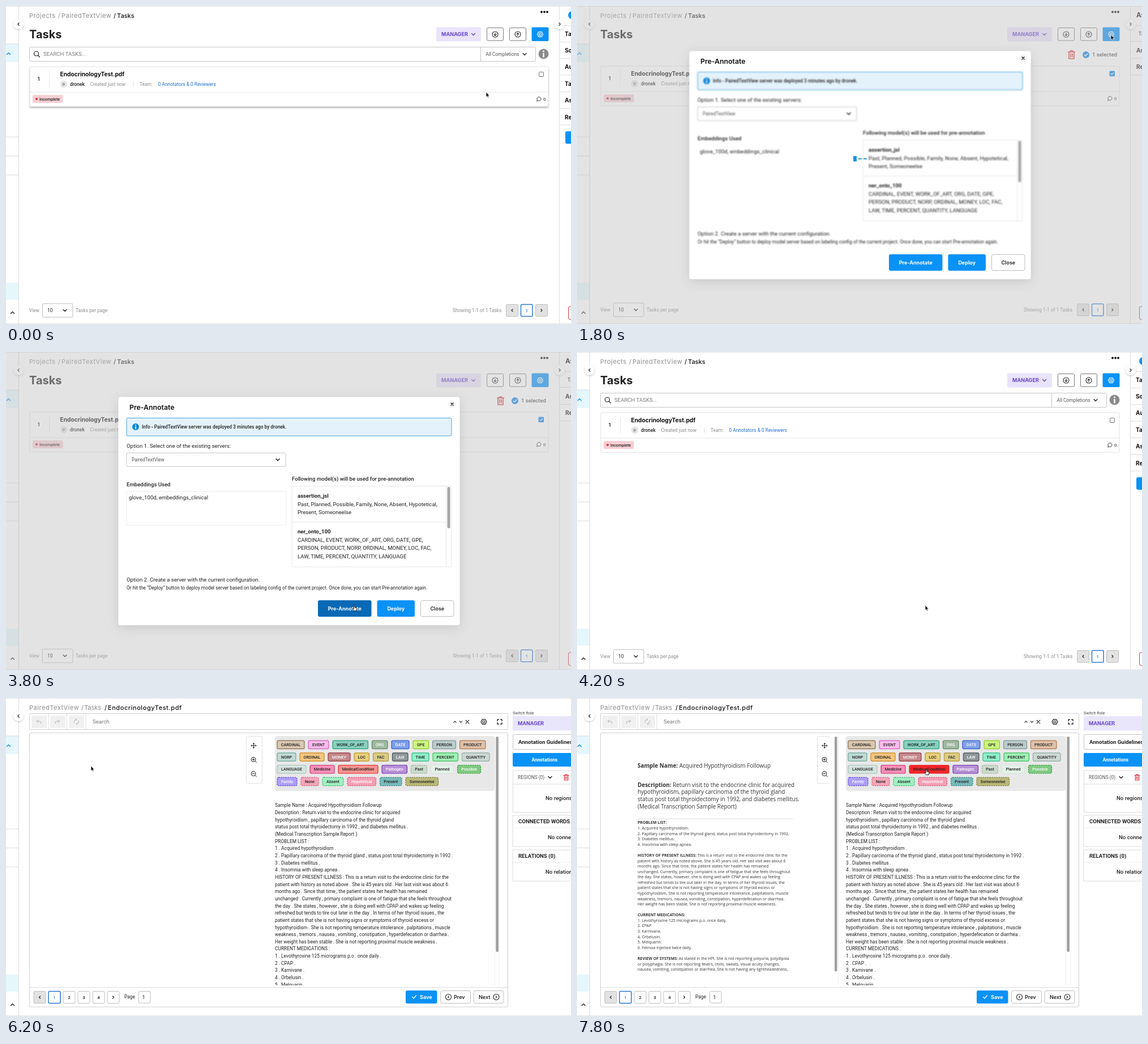
An HTML page for the animation above (8000 ms loop, 998 by 561 pixels).

```html
<!DOCTYPE html>
<html lang="en">
<head>
<meta charset="utf-8">
<title>Task pre-annotation</title>
<style>
html, body { margin: 0; width: 100%; height: 100%; overflow: hidden; background: #fff; }
svg { display: block; width: 100%; height: 100%; }
text { font-family: Roboto, sans-serif; white-space: pre; }
.h { font-family: Inter, sans-serif; }
.m { font-weight: 500; }
.s { font-weight: 600; }
.b { font-weight: 700; }
.crumb { letter-spacing: .55px; }
.doc { font-family: "Open Sans", sans-serif; }
</style>
</head>
<body>
<svg id="stage" viewBox="0 0 998 561"></svg>
<script>
const BLUE = '#0a92f6', PURPLE = '#6847cf', RED = '#d9303c', INK = '#222', GREY = '#8c8c8c', LINE = '#dcdcdc';
const USER = 'dronek', PROJECT = 'PairedTextView', FILE = 'EndocrinologyTest.pdf';

// Drawing helpers; text is placed by its vertical centre.
const text = (x, y, s, size = 8.4, fill = INK, cls = '', anchor = 'start') =>
  `<text x="${x}" y="${y + size * .355}" font-size="${size}" fill="${fill}" class="${cls}" text-anchor="${anchor}">${s}</text>`;
const mid = (x, y, s, size, fill, cls) => text(x, y, s, size, fill, cls, 'middle');
const rect = (x, y, w, h, fill = 'none', stroke = 'none', rx = 0, more = '') =>
  `<rect x="${x}" y="${y}" width="${w}" height="${h}" rx="${rx}" fill="${fill}" stroke="${stroke}" ${more}/>`;
const circle = (x, y, r, fill = 'none', stroke = 'none', more = '') =>
  `<circle cx="${x}" cy="${y}" r="${r}" fill="${fill}" stroke="${stroke}" ${more}/>`;
const path = (d, stroke = INK, width = 1, fill = 'none') =>
  `<path d="${d}" stroke="${stroke}" stroke-width="${width}" fill="${fill}" stroke-linecap="round" stroke-linejoin="round"/>`;
const hline = (x, x2, y, color = LINE) => path(`M${x} ${y}H${x2}`, color);
const vline = (x, y, y2, color = LINE) => path(`M${x} ${y}V${y2}`, color);
const group = (id, body, more = '') => `<g id="${id}" ${more}>${body}</g>`;
const chevron = (x, y, angle, color = INK, r = 3, width = 1.4) =>
  `<g transform="translate(${x} ${y}) rotate(${angle})">${path(`M${-r} ${-r / 2}L0 ${r / 2}L${r} ${-r / 2}`, color, width)}</g>`;
const arrowIcon = (x, y, angle) => circle(x, y, 5, 'none', INK, 'stroke-width="1.1"') +
  `<g transform="translate(${x} ${y}) rotate(${angle})">${path('M0-2.4V2.2M-2 .3L0 2.4L2 .3', INK, 1.1)}</g>`;
const gear = (x, y, color, r = 5) => {
  const pts = [0, 1, 2, 3, 4, 5].map(i => [x + r * Math.cos(i * Math.PI / 3), y + r * Math.sin(i * Math.PI / 3)]);
  return path('M' + pts.join('L') + 'Z', color, 1.2) + circle(x, y, r * .4, 'none', color, 'stroke-width="1.1"');
};
const trash = (x, y, k) => `<g transform="translate(${x} ${y}) scale(${k})">` +
  path('M-6-5H6M-2-5V-7H2V-5M-4.5-5V7H4.5V-5M-1.5-2V4M1.5-2V4', RED, 1.6) + '</g>';
const info = (x, y, r, color) => circle(x, y, r, color) +
  circle(x, y - r * .5, r * .16, '#fff') + path(`M${x} ${y - r * .05}V${y + r * .55}`, '#fff', r * .28);
const pageBox = (x, y, w, label, kind) =>
  rect(x, y, w, 21, kind === 'off' ? '#e2e2e2' : '#fff', kind === 'on' ? '#2a78d8' : '#bdbdbd', 2,
    kind === 'on' ? 'stroke-width="1.5"' : '') +
  (label === '<' ? chevron(x + w / 2, y + 10.5, 90, INK, 2, 1.2)
    : label === '>' ? chevron(x + w / 2, y + 10.5, -90, INK, 2, 1.2)
    : mid(x + w / 2, y + 10.5, label, 8, kind === 'on' ? '#2a78d8' : INK, 'm'));
const knob = (x, angle) => circle(x, 32, 9, '#fff', 'none', 'filter="url(#soft)"') + chevron(x, 32, angle, INK, 2.4, 1.2);

const sidebar = hline(0, 998, .5, '#e4e4e4') + hline(0, 998, 560.5, '#e4e4e4') +
  rect(0, 67, 22, 32, '#e6f6fd') + chevron(4.5, 84, 180, BLUE) +
  [67, 231, 264.5, 298].map(y => hline(0, 22, y)).join('') +
  rect(0, 488, 22, 30, '#e6f7fc') + chevron(11.5, 541, 180) + vline(22.5, 0, 561) + knob(22, 90);

const toolButtons = x => rect(x, 37.5, 79, 25, '#e9e3fb', 'none', 2) +
  text(x + 9, 50, 'MANAGER', 9.1, PURPLE, 'h b') + chevron(x + 65.5, 50, 0, PURPLE) +
  [[89.5, 0], [129.5, 180]].map(([dx, a]) => rect(x + dx, 38.5, 29, 22.5, '#fff', '#777', 2) + arrowIcon(x + dx + 14.5, 50, a)).join('');

const searchBar = rect(41.5, 72.5, 894, 25, '#fff', '#c4c4c4', 2) + vline(838.5, 73, 97, '#c4c4c4') +
  circle(53.5, 84, 4, 'none', INK, 'stroke-width="1.2"') + path('M56.5 87L59.5 90', INK, 1.2) +
  text(66, 85, 'SEARCH TASKS...', 9.6, '#777') + text(847.5, 85, 'All Completions', 8.4, '#555') +
  chevron(916, 85, 0) + info(949.5, 84.5, 9, '#8b8b8b');

const selectedBar = trash(873.5, 86, 1) + circle(899, 86, 6, '#0f8be8') + path('M896.3 86.2L898.3 88.2L901.8 84.2', '#fff', 1.3) +
  text(910, 86, '1 selected', 9.6);

const row = group('rowShade', rect(42, 108, 916, 69.5, '#fff', 'none', 2, 'filter="url(#drop)"')) +
  rect(42, 107, 916, 70, '#fff', '#e2e2e2', 2) + hline(42, 958, 152, '#e6e6e6') +
  vline(76.5, 115, 143, '#e6e6e6') + vline(225, 134, 142) +
  mid(58, 128.5, '1', 9.6, INK, 'm') + text(95.5, 120, FILE, 10.2, '#111', 'h b') +
  circle(102, 138, 6.2, '#e4e4e4') + mid(102, 138.3, 'D', 6, INK) + text(113, 138, USER, 8.4, INK, 'm') +
  text(148.5, 138, 'Created just now', 8.4, GREY) + text(236, 138, 'Team:', 8.4, GREY) +
  text(268.5, 138, '0 Annotators &amp; 0 Reviewers', 8.4, '#226fd4') +
  rect(47, 157, 53.5, 14, '#f9ced4', 'none', 2) + circle(54, 164, 2.1, RED) + text(59, 164, 'Incomplete', 7.2, INK, 'm') +
  path('M937.8 167.6L938.4 165.6A3.5 3.5 0 1 1 940 167.1Z', INK, .9) + text(949, 164, '0', 7.8) +
  rect(941.5, 116.5, 8, 8, '#fff', '#777', 1.5) +
  group('tick', rect(940.5, 115.5, 9.5, 9.5, '#0f86ea', 'none', 1.5) + path('M943 120.3L944.8 122L947.8 118.6', '#fff', 1.1));

const pager = text(41, 537, 'View', 8.4, GREY) + rect(64.5, 525, 53.5, 24, '#fff', '#bbb', 2) + text(73, 537, '10') + chevron(104, 537, 0) +
  text(123, 537, 'Tasks per page', 8.4, GREY) + text(789, 537, 'Showing 1-1 of 1 Tasks', 8.4, GREY) +
  pageBox(883.5, 526.5, 21, '<', 'off') + pageBox(909.5, 526.5, 20.5, '1', 'on') + pageBox(935.5, 526.5, 21, '>', 'off');

const sidePlain = circle(1000, 16, 7, BLUE) + ['Ta', 'So', 'Au', 'Ta', 'As', 'Re'].map((s, i) =>
  text(987, 49 + i * 29.4, s, 10, '#111', 'h b') + hline(978, 998, 34.5 + i * 29.2)).join('') +
  hline(978, 998, 210) + rect(988, 221, 20, 22, BLUE, 'none', 3);
const sideSelected = text(988, 16, 'As', 11.5, '#111', 'h b') + text(991.5, 48.5, 'Ta', 9.6) +
  text(988, 78, 'As', 10, '#111', 'h b') + text(988, 107.5, 'Re', 10, '#111', 'h b') +
  [34.5, 62.5, 92.5, 121.5].map(y => hline(978, 998, y)).join('');

const listPage =
  text(41, 17.5, 'Projects', 11, GREY, 'h crumb') + text(92, 17.5, '/', 11, GREY, 'h') + text(98, 17.5, PROJECT, 11, GREY, 'h crumb') +
  text(190, 17.5, '/', 11, INK, 'h m') + text(196, 17.5, 'Tasks', 11, '#111', 'h m') +
  [946, 951, 956].map(x => circle(x, 10.5, 1.9, '#111')).join('') +
  text(41, 49.5, 'Tasks', 20, '#222', 'h b') +
  group('idleTools', toolButtons(760) + rect(928.5, 37.5, 30, 24.5, BLUE, 'none', 2) + gear(943.5, 50, '#fff')) +
  group('runTools', toolButtons(703.5) + rect(872.5, 38, 86, 23, '#fff', '#a9b5d6', 2) + text(881, 50, 'Task(s) running', 8.6, '#a9b0d8', 'h s')) +
  group('search', searchBar) + group('selected', selectedBar) + group('list', row + pager) +
  vline(977.5, 0, 561) + group('sidePlain', sidePlain) + group('sideSelected', sideSelected) +
  rect(993.5, 530, 20, 23, '#fff', RED, 3) + knob(978, -90);

const button = (x, w, label, id = '') => rect(x, 438, w, 29, BLUE, 'none', 3, id) + mid(x + w / 2, 452.5, label, 9, '#fff', 'h b');
const models = (y, name, lines) => text(515, y, name, 9.6, INK, 'b') + lines.map((s, i) => text(515, y + 14.5 * (i + 1), s, 9.6)).join('');
const modal = rect(0, 0, 998, 561, 'rgba(195,195,195,.46)') +
  rect(198.5, 79.5, 603, 402.5, '#fff', 'none', 4, 'filter="url(#glow)"') +
  text(218, 97.5, 'Pre-Annotate', 12.3, '#111', 'h s') + circle(788, 92, 7, '#f4f4f4') + path('M786 90L790 94M790 90L786 94', '#111', 1.4) +
  group('modalBody',
    rect(213, 116.5, 574, 31.5, '#e4f2fc', '#4aa3df', 2) + info(229, 132, 6, '#1188dd') +
    text(240, 132, `Info - ${PROJECT} server was deployed 3 minutes ago by ${USER}.`, 8.4, INK, 'm') +
    text(213, 165.5, 'Option 1. Select one of the existing servers:', 9.6) +
    rect(213, 178, 281, 24, '#fff', '#c4c4c4', 2) + text(222, 190, PROJECT, 8.4, '#555') + chevron(480, 190, 0, INK, 3, 1.6) +
    text(213, 233.5, 'Embeddings Used', 9.6, INK, 'm') + group('embedBox', rect(213, 246, 282, 59.5, 'none', '#ececec')) +
    text(217, 256.5, 'glove_100d, embeddings_clinical', 9.6) +
    text(505, 224, 'Following model(s) will be used for pre-annotation', 9.6, INK, 'm') +
    rect(505, 236.5, 281.5, 142.5, 'none', '#e6e6e6') + hline(505, 778, 300, '#e6e6e6') + vline(777.5, 237, 379, '#e8e8e8') +
    rect(779.5, 238, 5, 73, '#a6a6a6', 'none', 2.5) +
    models(254, 'assertion_jsl', ['Past, Planned, Possible, Family, None, Absent, Hypotetical,', 'Present, Someoneelse']) +
    models(317, 'ner_onto_100', ['CARDINAL, EVENT, WORK_OF_ART, ORG, DATE, GPE,', 'PERSON, PRODUCT, NORP, ORDINAL, MONEY, LOC, FAC,', 'LAW, TIME, PERCENT, QUANTITY, LANGUAGE']) +
    text(213, 401.5, 'Option 2. Create a server with the current configuration.', 9.6) +
    text(213, 416.5, 'Or hit the “Deploy” button to deploy model server based on labeling config of the current project. Once done, you can start Pre-annotation again.')) +
  group('loader', rect(-3, -4.7, 6, 9.4, '#1b95e0') + rect(6, -1, 6, 2, '#1b95e0') + rect(15, -1, 6, 2, '#1b95e0')) +
  button(551, 94.5, 'Pre-Annotate', 'id="preBtn"') + button(655.5, 66.5, 'Deploy') +
  rect(732.5, 438.5, 58.5, 28, '#fff', '#bdbdbd', 3) + mid(761.8, 452.5, 'Close', 9, INK, 'h s');

// label, width, fill, border; "w" = white text, "d" = dashed border
const chipRows = [
  'CARDINAL 48 d9c7b0 8d6e4e,EVENT 36 f8bbea d45fc0,WORK_OF_ART 62.5 86d0be 2b9c80,ORG 27.5 a0b8a2 5c8a62 w,DATE 31 7f9fe8 2f5bd0 w,GPE 27.5 cbf582 8fc926,PERSON 41 bccaca 7c9696,PRODUCT 45.5 dfc0a8 b0794e',
  'NORP 33 c0dad4 6ea99c,ORDINAL 43 f5c57f d08a1e,MONEY 39 c4888c 99383f w,LOC 26.5 e8cf7c bd9820,FAC 27 dccb86 b39a34,LAW 27.5 90979a 4b5356 w,TIME 30 90f0ca 2fbd86,PERCENT 44.5 a0f0b5 3fc062,QUANTITY 48.5 ccd9d4 93aca3',
  'LANGUAGE 51 d5e3df a6c4bb,Medicine 43 f690b8 d4336f,MedicalCondition 70 f59390 f0262a,Pathogen 44.5 b690d6 7a37b3 w,Past 28 cbdacc 8fae92 d,Planned 40 e4f2e8 c9e4d2 d,Possible 41 80c982 2f9a35 wd',
  'Family 35 ad9ff6 5a3fe0 wd,None 31 f5a6ba e0527a d,Absent 37 a0f0c2 35b670 d,Hypotetical 50.5 f3a0b6 e24a74 wd,Present 38.5 7abaBa 25807f d,Someoneelse 57.5 b9b97a 77772a d'];
const chips = chipRows.flatMap((line, r) => {
  let next = 479;
  return line.split(',').map(item => {
    const [label, w, fill, edge, flags = ''] = item.split(' '), x = next;
    next += +w + 7;
    return { label, x, y: 75.2 + r * 21.65, w: +w, fill: '#' + fill, edge: '#' + edge, flags };
  });
});
const chipArt = chips.map((c, i) =>
  rect(c.x, c.y, c.w, 14.5, c.fill, c.edge, 2.5, `id="chip${i}" stroke-width="1.2" ${c.flags.includes('d') ? 'stroke-dasharray="2.5 1.5"' : ''}`) +
  mid(c.x + c.w / 2, c.y + 7.3, c.label, 7.2, c.flags.includes('w') ? '#fff' : '#222', 'm')).join('');

const report = `Sample Name: Acquired Hypothyroidism Followup
Description: Return visit to the endocrine clinic for acquired
hypothyroidism, papillary carcinoma of the thyroid gland
status post total thyroidectomy in 1992, and diabetes mellitus.
(Medical Transcription Sample Report)
PROBLEM LIST:
1. Acquired hypothyroidism.
2. Papillary carcinoma of the thyroid gland, status post total thyroidectomy in 1992.
3. Diabetes mellitus.
4. Insomnia with sleep apnea.

HISTORY OF PRESENT ILLNESS: This is a return visit to the endocrine clinic for the
patient with history as noted above. She is 45 years old. Her last visit was about 6
months ago. Since that time, the patient states her health has remained
unchanged. Currently, primary complaint is one of fatigue that she feels throughout
the day. She states, however, she is doing well with CPAP and wakes up feeling
refreshed but tends to tire out later in the day. In terms of her thyroid issues, the
patient states that she is not having signs or symptoms of thyroid excess or
hypothyroidism. She is not reporting temperature intolerance, palpitations, muscle
weakness, tremors, nausea, vomiting, constipation, hyperdefecation or diarrhea.
Her weight has been stable. She is not reporting proximal muscle weakness.

CURRENT MEDICATIONS:
1. Levothyroxine 125 micrograms p.o. once daily.
2. CPAP.
3. Karnivane.
4. Orbelusin.
5. Melquarin.
6. Felmoa injected twice daily.

REVIEW OF SYSTEMS: As stated in the HPI. She is not reporting polyuria, polydipsia
or polyphagia. She is not reporting fevers, chills, sweats, visual acuity changes,
nausea, vomiting, constipation or diarrhea. She is not having any lightheadedness,`.split('\n');
const tokens = report.filter(Boolean).slice(0, 26).map((s, i) =>
  text(475, 189.3 + i * 12.66, s.replace(/(\w)([.,:)])(?=\s|$)/g, '$1 $2'))).join('');
const scan = report.map((s, i) => {
  const line = s.replace(/^[A-Z][A-Za-z ]*:/, '<tspan font-weight="700">$&</tspan>');
  const y = i === 0 ? 119 : i < 5 ? 140.3 + i * 12.7 : 220 + (i - 5) * 9.58;
  return text(107, y, line, i < 5 ? 9.9 : 6.94, '#333', 'doc');
}).join('');

const zoomIcon = (y, plus) => circle(437, y - .5, 4, 'none', INK) + path(`M440 ${y + 2.5}L442.5 ${y + 5}M435 ${y - .5}H439${plus ? `M437 ${y - 2.5}V${y + 1.5}` : ''}`);
const panel = (y, title, note, noteX) => rect(895, y, 120, 55, '#fff', LINE) + text(905, y + 10.8, title, 9.6, INK, 'b') +
  hline(895, 998, y + 22, '#eee') + text(noteX, y + 38.5, note, 9.6, INK, 'm');
const editor =
  text(41, 17.5, PROJECT, 11, GREY, 'h crumb') + text(133, 17.5, '/', 11, GREY, 'h') + text(138, 17.5, 'Tasks', 11, GREY, 'h') +
  text(174, 17.5, '/', 11, INK, 'h m') + text(180, 17.5, FILE, 11, '#111', 'h m crumb') +
  rect(41.5, 27.5, 845, 28, '#fff', '#d0d0d0', 2) + [45, 78, 111].map(x => rect(x, 31, 27, 22, '#f0f0f0', 'none', 2)).join('') +
  [75.5, 107.5, 141].map(x => vline(x, 28, 55)).join('') +
  path('M57 38.5L54.5 41L57 43.5M54.5 41H59.5A2 2 0 0 1 61.5 43V45', '#b4b4b4') + path('M92 38.5L94.5 41L92 43.5M94.5 41H89.5A2 2 0 0 0 87.5 43V45', '#b4b4b4') +
  path('M120.5 43.5A3.8 3.8 0 0 1 124 38M128 40A3.8 3.8 0 0 1 124.5 45.5M123 36.5L124.7 38L123 39.7M126 44L124.3 45.5L126 47', '#b4b4b4') +
  text(153, 42, 'Search', 9.6, '#777') + chevron(793, 42, 180, INK, 2.2, 1.1) + chevron(803.5, 42, 0, INK, 2.2, 1.1) +
  path('M812.2 39.2L817.8 44.8M817.8 39.2L812.2 44.8', INK, 1.2) + gear(844, 42, INK) +
  path('M868 40.5V38H870.5M873.5 38H876V40.5M876 43.5V46H873.5M870.5 46H868V43.5', INK, 1.3) +
  rect(41.5, 61.5, 845, 483.5, '#fff', '#cfcfcf', 2) + hline(42, 886, 510.5) +
  rect(424.5, 67.5, 28, 83, '#fff', '#e0e0e0', 2) +
  path('M433 84H442M437.5 79.5V88.5M434.3 82.7L433 84L434.3 85.3M440.7 82.7L442 84L440.7 85.3M436.2 80.8L437.5 79.5L438.8 80.8M436.2 87.2L437.5 88.5L438.8 87.2') +
  zoomIcon(109, true) + zoomIcon(134, false) +
  group('scan', rect(447, 66, 15, 86, '#fff') + hline(107, 381, 213) + scan + vline(461.5, 62, 506, '#eee') + rect(455, 68, 4.5, 414.5, '#a0a0a0', 'none', 2.2)) +
  rect(475, 67, 388, 97, '#e8e8e8', 'none', 4) + chipArt +
  vline(863.5, 67, 506, '#eee') + vline(871.5, 67, 506, '#eee') + rect(865.3, 68, 4.7, 380, '#a0a0a0', 'none', 2.3) +
  group('', tokens, 'clip-path="url(#pane)"') +
  ['<', '1', '2', '3', '4', '>'].map((s, i) => pageBox(49 + i * 26, 517.5, 21, s, ['off', 'on'][i])).join('') +
  text(209, 527.5, 'Page') + rect(234.5, 517.5, 20.5, 20.5, '#fff', '#bdbdbd', 2) + text(240.5, 527.5, '1', 9) +
  rect(706, 516, 55.5, 23, BLUE, 'none', 3) + path('M717.5 527.5L720 530L724.5 524.8', '#fff', 1.3) + text(731, 527.5, 'Save', 9, '#fff', 'h b') +
  [767.5, 826].map(x => rect(x, 516.5, 53, 22, '#fff', '#bdbdbd', 3)).join('') +
  [[781.5, 90], [866, -90]].map(([x, a]) => circle(x, 527.5, 5, 'none', INK, 'stroke-width="1.1"') + chevron(x, 527.5, a, INK, 1.8, 1.1)).join('') +
  text(791, 527.5, 'Prev', 9, INK, 'h s') + text(835, 527.5, 'Next', 9, INK, 'h s') +
  text(895, 26, 'Switch Role', 7.2, '#444') + rect(895, 32, 110, 25.5, '#e9e5fa') + text(904, 44.8, 'MANAGER', 9.6, PURPLE, 'b') +
  rect(895.5, 64.5, 110, 26, '#fff', '#c4c4c4', 2) + text(905, 77.5, 'Annotation Guidelines', 9.6, INK, 'b') +
  rect(895, 97, 110, 24, BLUE, 'none', 2) + text(928.5, 109, 'Annotations', 8.4, '#fff', 'b') +
  rect(895.5, 128, 110, 73.5, '#fff', LINE) + hline(895, 998, 152) + text(904, 140, 'REGIONS (0)', 8.4, '#555') + chevron(961, 140, 0) + trash(989.5, 140, .72) +
  text(953, 176.5, 'No regions yet', 9.6, INK, 'm') + panel(207, 'CONNECTED WORDS', 'No connections', 957) + panel(268, 'RELATIONS (0)', 'No relations', 953);

const cursor = group('arrow', path('M0 0V8.6L1.9 6.9L3.3 9.8L4.7 9.1L3.4 6.3H6Z', '#fff', .7, '#111')) +
  group('hand', path('M-.9 .6Q0-.6 .9 .6V3.6L4.2 4.4Q5 4.8 4.8 6L4 9.6H-.6L-3 6.4Q-3.2 5.2-2 5.4L-.9 6.2Z', '#111', .9, '#fff'));

const stage = document.getElementById('stage');
stage.innerHTML = `<defs>
  <filter id="soft" x="-50%" y="-50%" width="200%" height="200%"><feDropShadow dx="0" dy="1" stdDeviation="1.5" flood-opacity=".25"/></filter>
  <filter id="drop" x="-2%" y="-20%" width="104%" height="150%"><feDropShadow dx="0" dy="2" stdDeviation="1.4" flood-opacity=".35"/></filter>
  <filter id="glow" x="-10%" y="-10%" width="120%" height="125%"><feDropShadow dx="0" dy="4" stdDeviation="10" flood-opacity=".12"/></filter>
  <clipPath id="pane"><rect x="462" y="62" width="402" height="445"/></clipPath></defs>` +
  group('listPage', listPage) + group('editor', editor) + sidebar + group('modal', modal) +
  group('ring', circle(0, 0, 18, 'rgba(0,0,0,.08)', '#222', 'stroke-width="1.2"')) + group('cursor', cursor);

const el = id => document.getElementById(id);
const show = (id, on) => el(id).setAttribute('display', on ? 'inline' : 'none');
const move = (id, x, y) => el(id).setAttribute('transform', `translate(${x} ${y})`);
const within = (t, spans) => spans.some(([a, b]) => t >= a && t < b);

// time, x, y of the pointer tip
const track = [[0, 848, 152], [600, 944, 118], [1000, 944, 118], [1400, 943, 51], [1800, 943, 51], [2400, 720, 390], [2800, 615, 447],
  [4800, 615, 447], [5400, 198, 144], [5600, 150, 120], [6200, 150, 120], [6400, 369, 202], [7200, 815, 118],
  [7400, 806, 122], [7600, 562, 122], [7800, 617, 126], [8000, 617, 126]];
const pointer = t => {
  const i = track.findIndex(k => k[0] > t), [a, x, y] = track[i - 1], [b, x2, y2] = track[i], f = (t - a) / (b - a);
  return [x + (x2 - x) * f, y + (y2 - y) * f];
};

function draw(now) {
  const t = Math.floor(now % 8000 / 200) * 200;   // the picture advances in 200 ms steps
  const [x, y] = pointer(t);
  const edit = t >= 6200, picked = within(t, [[800, 4200]]), open = within(t, [[1800, 4200]]);
  const running = t >= 4400, loading = t < 2800, press = within(t, [[2800, 4200]]);
  show('listPage', !edit);
  show('editor', edit);
  show('modal', open);
  show('idleTools', !running);
  show('runTools', running);
  for (const id of ['selected', 'sideSelected', 'tick']) show(id, picked);
  for (const id of ['search', 'sidePlain']) show(id, !picked);
  show('rowShade', !picked && y > 107 && y < 177);
  move('list', 0, picked ? -1 : 0);

  el('modalBody').style.filter = loading ? 'blur(.9px)' : 'none';
  show('embedBox', !loading);
  show('loader', loading);
  move('loader', 491 + (t - 1800) % 800 / 200 * 6, 269.5);
  el('preBtn').setAttribute('fill', press ? '#0969b5' : BLUE);

  show('scan', t >= 6800);
  chips.forEach((c, i) => {
    const over = edit && x > c.x && x < c.x + c.w && y > c.y && y < c.y + 14.5;
    el('chip' + i).setAttribute('fill', over ? c.edge : c.fill);
  });

  const hand = within(t, [[600, 1200], [1400, 1800], [2800, 4200], [5600, 6200], [7200, 8000]]);
  show('hand', hand);
  show('arrow', !hand);
  move('cursor', x, y);
  show('ring', within(t, [[800, 1000], [1600, 1800], [3400, 3600], [5800, 6000]]));
  move('ring', x, y);
}

const start = performance.now();
(function tick() {
  draw(performance.now() - start);
  requestAnimationFrame(tick);
})();
</script>
</body>
</html>
```
